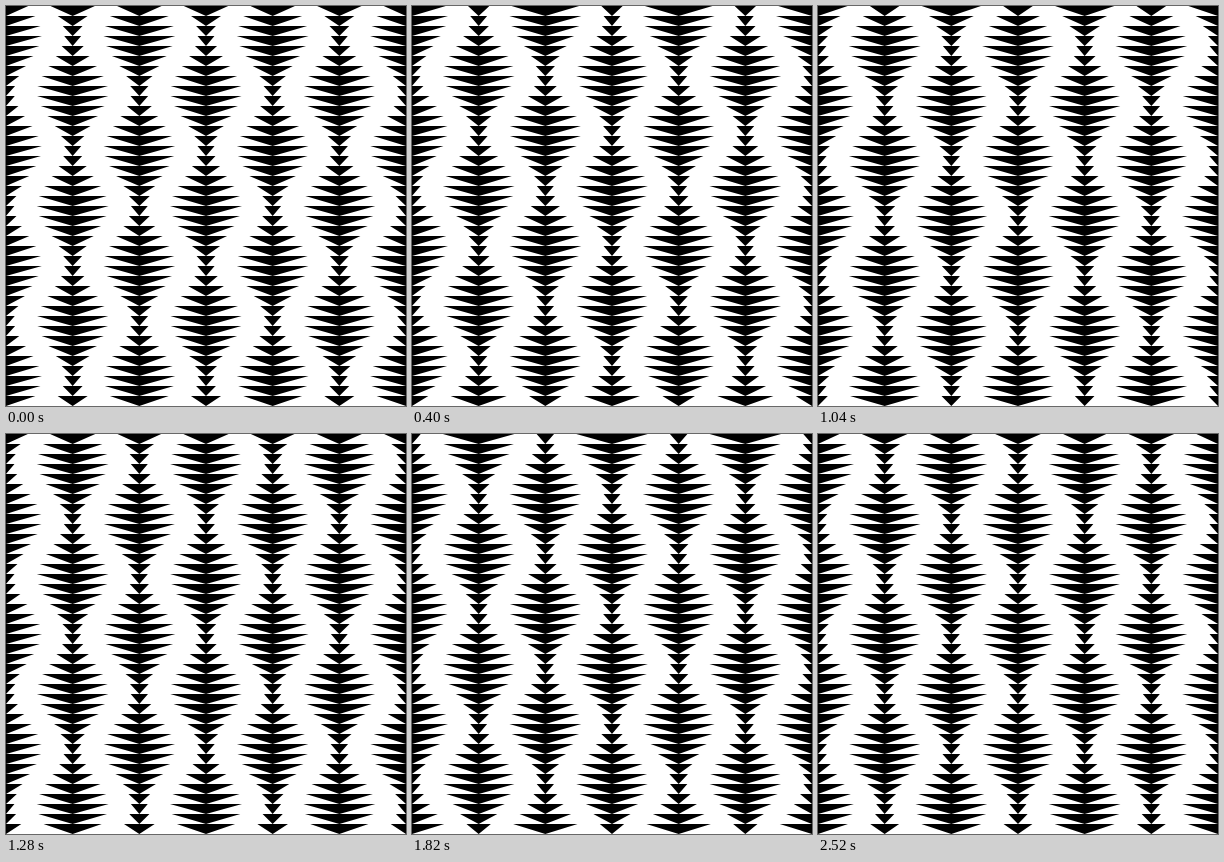
Write an HTML page with a canvas that moves like this. It is 400 px wide and 400 px high and loops after 2.54 s.

```html
<!DOCTYPE html>
<html lang="en">
<head>
<meta charset="utf-8">
<title>Triangle waves</title>
<style>
  html, body { margin: 0; height: 100%; overflow: hidden; background: #fff; }
  canvas { display: block; }
</style>
</head>
<body>
<canvas id="stage" width="400" height="400"></canvas>
<script>
const ctx = document.getElementById('stage').getContext('2d');
const LOOP = 2540, SIZE = 400, ROW = 10, GAP = SIZE / 6;
const MEAN = GAP / 3, SWING = 13.8, WAVES = 3.5;

function draw(now) {
  const t = now % LOOP / LOOP;
  ctx.fillStyle = '#fff';
  ctx.fillRect(0, 0, SIZE, SIZE);
  ctx.fillStyle = '#000';
  ctx.beginPath();
  for (let y = 0; y < SIZE; y += ROW) {
    const wave = SWING * Math.sin(2 * Math.PI * (t + WAVES * y / SIZE));
    for (let col = 0; col <= 6; col++) {
      const x = col * GAP;
      // Neighbouring columns swing in opposite directions
      const half = MEAN + (col % 2 ? -wave : wave);
      ctx.moveTo(x - half, y);
      ctx.lineTo(x + half, y);
      ctx.lineTo(x, y + ROW);
      ctx.closePath();
    }
  }
  ctx.fill();
}

function tick() {
  draw(performance.now());
  requestAnimationFrame(tick);
}
tick();
</script>
</body>
</html>
```
